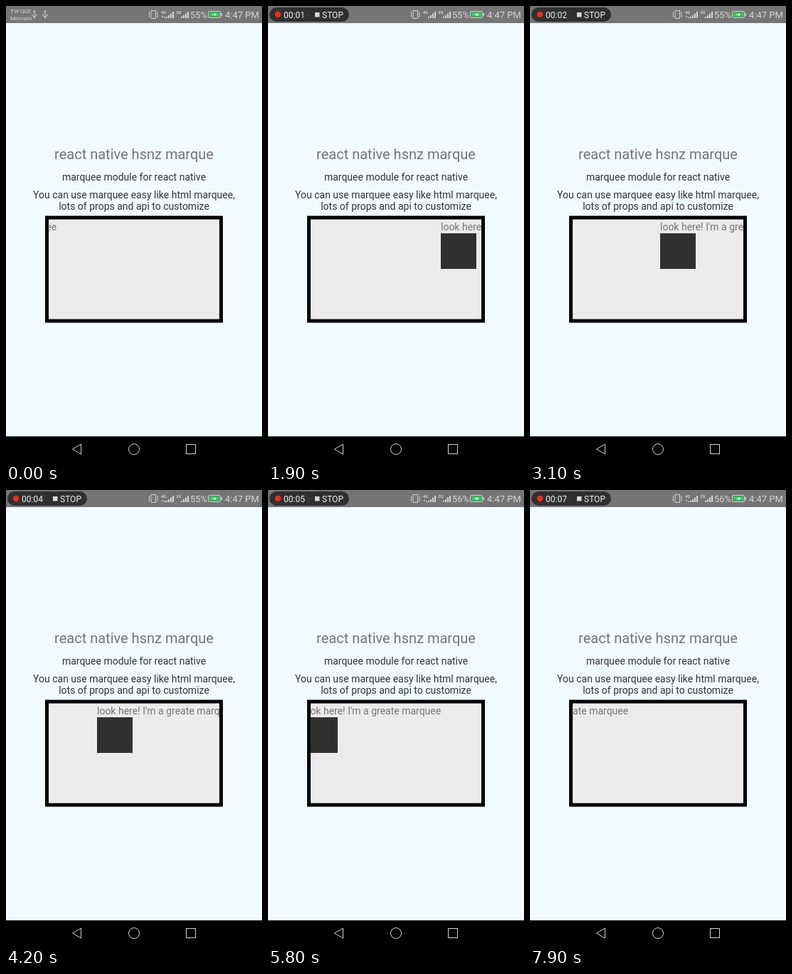
Write an HTML page that moves like this. It is 360x640 px and loops after 8 s.

```html
<!DOCTYPE html>
<html lang="en">
<head>
<meta charset="utf-8">
<title>Marquee demo</title>
<style>
  html, body { margin: 0; width: 100%; height: 100%; overflow: hidden; background: #f1fbff; }
  svg { display: block; width: 360px; height: 640px; font-family: Roboto, sans-serif; }
  .mid { text-anchor: middle; }
  .line { fill: none; stroke: #d2d2d2; stroke-width: 1; }
</style>
</head>
<body>
<svg viewBox="0 0 360 640">
  <defs>
    <clipPath id="inner"><rect x="59.5" y="299.5" width="240.5" height="140"/></clipPath>
    <g id="usb" class="line">
      <path d="M0-5V5M-3-1V1.500L0 3.500L3 1V-1"/>
      <path d="M-1.500-3.500L0-5.500L1.500-3.500"/>
      <circle cy="4.500" r="1" fill="#d2d2d2" stroke="none"/>
    </g>
    <path id="bars" d="M0 17v-2h2v2zM3 17v-4h2v4zM6 17v-6.500h2v6.500zM9 17v-9h2v9z"/>
  </defs>

  <rect width="360" height="640" fill="#f1fbff"/>
  <rect width="360" height="24" fill="#757575"/>

  <g fill="#d6d6d6">
    <g font-size="8">
      <text x="6" y="10">TW-QUZ</text>
      <text x="6" y="20">Morvalin</text>
    </g>
    <use href="#usb" x="40" y="12"/>
    <use href="#usb" x="55" y="12"/>
    <path class="line" d="M204 6.500h6.500v11h-6.500zM201.500 8v8M213 8v8" stroke-width="1.300"/>
    <use href="#bars" x="225"/>
    <use href="#bars" x="246"/>
    <g font-size="5.500" font-weight="700">
      <text x="218" y="11">4G</text>
      <text x="239.500" y="11">2G</text>
    </g>
    <path id="data" d="M218.500 15.500l1.500-2l1.500 2zM221.500 15.500h3l-1.500 2z"/>
    <text id="charge" x="259" y="16.500" font-size="13"></text>
    <rect x="284.500" y="7.500" width="17" height="9" rx="1.500" class="line"/>
    <rect x="302.500" y="10" width="1.500" height="4"/>
    <rect x="286" y="9" width="14" height="6" fill="#22cf52"/>
    <path d="M290 11.500h3v-1.500l3.500 2l-3.500 2v-1.500h-3z" fill="#fff"/>
    <text x="308" y="16.500" font-size="13">4:47 PM</text>
  </g>

  <g id="pill" fill="#f2f2f2" font-size="12">
    <rect x="2" y="2" width="112" height="20" rx="10" fill="#2b2b2b" fill-opacity=".93"/>
    <circle id="dot" cx="14" cy="12" r="4.200" fill="#fa2a1c"/>
    <text id="timer" x="22" y="16.500"></text>
    <rect x="66" y="9" width="6.500" height="6.500" fill="#d8d8d8"/>
    <text x="76" y="16.500">STOP</text>
  </g>

  <text class="mid" x="180" y="215" font-size="20" fill="#757575">react native hsnz marque</text>
  <g class="mid" font-size="14" fill="#333">
    <text x="180" y="245">marquee module for react native</text>
    <text x="180" y="269.500">You can use marquee easy like html marquee,</text>
    <text x="180" y="286">lots of props and api to customize</text>
  </g>

  <rect x="57.500" y="297" width="245" height="145" fill="#ebebeb" stroke="#000" stroke-width="5"/>
  <g clip-path="url(#inner)">
    <g id="marquee">
      <text y="315" font-size="14" fill="#757575">look here! I'm a greate marquee</text>
      <rect y="319" width="50" height="50" fill="#303030"/>
    </g>
  </g>

  <rect y="604" width="360" height="36"/>
  <g class="line" stroke-width="1.300">
    <path d="M105.500 615v14l-12-7z"/>
    <circle cx="180" cy="622" r="7.500"/>
    <rect x="253.500" y="615.500" width="13" height="13"/>
  </g>
</svg>
<script>
  const LOOP = 8000, STEP = 100, SPEED = 0.05;
  const TEXT_WIDTH = 194, RESTART = 760, CLOCK_LAG = 150;
  const el = id => document.getElementById(id);
  const [pill, dot, timer, charge, data, marquee] =
    ['pill', 'dot', 'timer', 'charge', 'data', 'marquee'].map(el);
  const show = (node, on) => node.setAttribute('opacity', +on);

  // The previous pass leaves on the left before the next enters on the right.
  const marqueeX = t => t < 500
    ? 70 - TEXT_WIDTH - t * SPEED
    : 300 - (t - RESTART) * SPEED;

  function draw(now) {
    const t = Math.floor(now % LOOP / STEP) * STEP;
    const phase = t % 1000;
    const seconds = Math.max(0, Math.floor((t - CLOCK_LAG) / 1000));
    marquee.setAttribute('transform', `translate(${marqueeX(t)} 0)`);
    show(pill, Math.min(1, t / 400));
    show(dot, phase < 300 || phase >= 700);
    show(data, t % 5000 < 1800 || t % 5000 >= 2100);
    timer.textContent = '00:0' + seconds;
    charge.textContent = t < 4700 ? '55%' : '56%';
  }

  const start = performance.now();
  function tick() {
    draw(performance.now() - start);
    requestAnimationFrame(tick);
  }
  tick();
</script>
</body>
</html>
```
